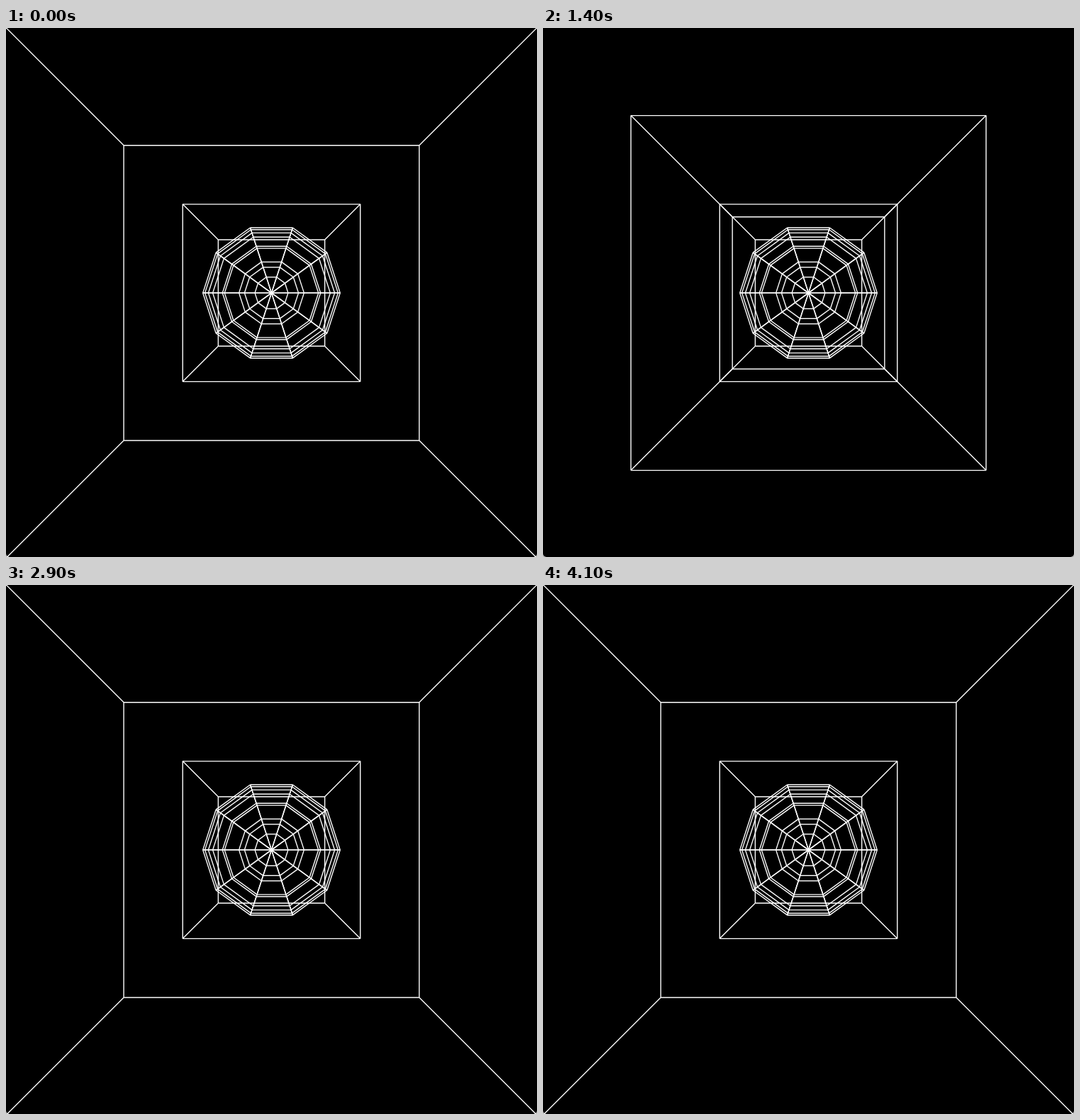
Recreate the animation shown at these times as an HTML page with a canvas. Size 749 by 747 pixels, loop 5.8 s.

```html
<!DOCTYPE html>
<html lang="en">
<head>
<meta charset="utf-8">
<title>Wireframe cubes and sphere</title>
<style>
  html, body { margin: 0; width: 100%; height: 100%; overflow: hidden; background: #000; }
  canvas { display: block; }
</style>
</head>
<body>
<canvas id="stage" width="749" height="747"></canvas>
<script>
const ctx = document.getElementById('stage').getContext('2d');
const WIDTH = 749, HEIGHT = 747;
const LOOP = 5800, STEP = 100;
const FOCAL = 375.75, CX = 374.5, CY = 374.1, NEAR = 0.2;
const LINE_WIDTH = 1.4, CORNER_RADIUS = 5;
const SPHERE_Z = 4, SEGMENTS = 10;
const REST_Z = 0.803, PUSHED_Z = 2.5;
const PUSH_START = 1000, PUSH_PEAK = 1400, PUSH_END = 1781;

const clamp = v => Math.min(1, Math.max(0, v));
const easeInOut = p => p < 0.5 ? 4 * p ** 3 : 1 - 4 * (1 - p) ** 3;
const project = ([x, y, z]) => [CX + FOCAL * x / z, CY + FOCAL * y / z];

function clipToNear(a, b) {
  if (a[2] >= NEAR) return a;
  const k = (NEAR - a[2]) / (b[2] - a[2]);
  return a.map((v, i) => v + (b[i] - v) * k);
}

function edge(a, b) {
  if (a[2] < NEAR && b[2] < NEAR) return;
  ctx.beginPath();
  ctx.moveTo(...project(clipToNear(a, b)));
  ctx.lineTo(...project(clipToNear(b, a)));
  ctx.stroke();
}

function drawCube(z) {
  const corners = [[-1, -1], [1, -1], [1, 1], [-1, 1]];
  corners.forEach(([x, y], i) => {
    const [nx, ny] = corners[(i + 1) % 4];
    for (const side of [z - 1, z + 1]) edge([x, y, side], [nx, ny, side]);
    edge([x, y, z - 1], [x, y, z + 1]);
  });
}

function spherePoint(ring, segment) {
  const lat = Math.PI * ring / SEGMENTS;
  const lon = 2 * Math.PI * segment / SEGMENTS;
  const r = Math.sin(lat);
  return [r * Math.cos(lon), r * Math.sin(lon), SPHERE_Z - Math.cos(lat)];
}

function drawSphere() {
  for (let ring = 0; ring < SEGMENTS; ring++) {
    for (let s = 0; s < SEGMENTS; s++) {
      const p = spherePoint(ring, s);
      edge(p, spherePoint(ring + 1, s));
      if (ring) edge(p, spherePoint(ring, s + 1));
    }
  }
}

// Black stage with light rounded corners at the bottom
function drawBackground() {
  ctx.fillStyle = '#bbb';
  ctx.fillRect(0, 0, WIDTH, HEIGHT);
  ctx.fillStyle = '#000';
  ctx.beginPath();
  ctx.roundRect(0, 0, WIDTH, HEIGHT, [0, 0, CORNER_RADIUS, CORNER_RADIUS]);
  ctx.fill();
}

function movingCubeZ(t) {
  const p = t < PUSH_PEAK
    ? (t - PUSH_START) / (PUSH_PEAK - PUSH_START)
    : (PUSH_END - t) / (PUSH_END - PUSH_PEAK);
  return REST_Z + (PUSHED_Z - REST_Z) * easeInOut(clamp(p));
}

function draw(t) {
  drawBackground();
  ctx.strokeStyle = '#fff';
  ctx.lineWidth = LINE_WIDTH;
  drawCube(movingCubeZ(t));
  drawCube(SPHERE_Z);
  drawSphere();
}

let lastTick = -1;
function loop() {
  const tick = Math.floor((performance.now() % LOOP) / STEP);
  if (tick !== lastTick) draw(tick * STEP);
  lastTick = tick;
  requestAnimationFrame(loop);
}
loop();
</script>
</body>
</html>
```
